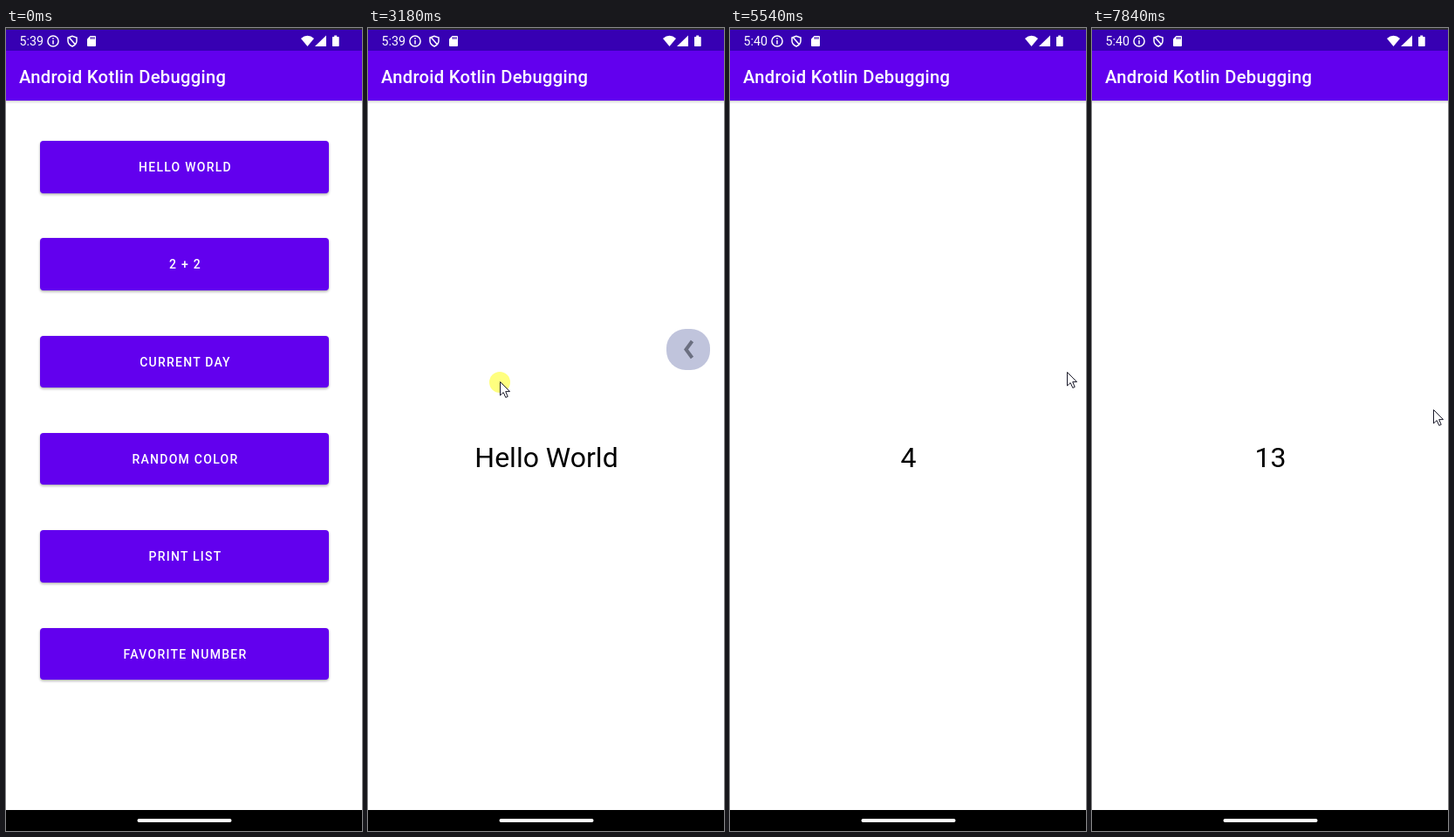
Write an HTML page that moves like this. It is 408 px wide and 918 px high and loops after 8000 ms.

```html
<!DOCTYPE html>
<html lang="en">
<head>
<meta charset="utf-8">
<title>Android Kotlin Debugging</title>
<style>
html, body { margin: 0; width: 100%; height: 100%; overflow: hidden; background: #fff; }
#stage { position: relative; width: 408px; height: 918px; overflow: hidden; font-family: Roboto, sans-serif; color: #fff; }
.page, .overlay { position: absolute; left: 0; top: 0; width: 408px; height: 918px; }
/* pages reach past the stage so a sliding page leaves no gap */
.page::before { content: ""; position: absolute; left: -100px; right: -100px; top: 0; bottom: 0; background: #fff; }
.bar { position: absolute; left: -100px; right: -100px; top: 26px; height: 56.5px; background: #6200ee; box-shadow: 0 1px 3px rgba(0,0,0,.25); }
.title { position: absolute; left: 115px; top: 0; line-height: 61px; font-size: 20.2px; font-weight: 500; letter-spacing: .3px; white-space: nowrap; }
.btn { position: absolute; left: 39px; width: 331px; height: 59.5px; border-radius: 4px; background-color: #6200ee;
  box-shadow: 0 1.5px 3px rgba(0,0,0,.32); text-align: center; line-height: 61px; font-size: 14px; font-weight: 500;
  letter-spacing: .0893em; text-indent: 2px; }
#answer { position: absolute; left: 0; width: 409px; top: 471px; line-height: 40px; text-align: center; font-size: 32px; color: #000; }
#clock { position: absolute; left: 15.5px; top: 5px; line-height: 20px; font-size: 14.2px; }
</style>
</head>
<body>
<div id="stage">
  <div class="page" id="menu"><div class="bar"><span class="title">Android Kotlin Debugging</span></div></div>
  <div class="page" id="result"><div class="bar"><span class="title">Android Kotlin Debugging</span></div><div id="answer"></div></div>
  <svg class="overlay" viewBox="0 0 408 918">
    <path fill="#3700b3" d="M0 0H408V26H0z"/>
    <path fill="#2b2a30" d="M0 0H408V2H0z"/>
    <g fill="none" stroke="#fff" stroke-width="1.5">
      <circle cx="54" cy="15" r="6.1"/>
      <path d="M54 14V18.5M54 11.2V12.7"/>
      <path d="M76 9.2L71 11V15Q71.3 19 76 21Q80.7 19 81 15V11zM72.5 11L79.5 19"/>
    </g>
    <g fill="#fff">
      <path d="M96.5 9H102Q103 9 103 10V20Q103 21 102 21H94Q93 21 93 20V12.5z"/>
      <path d="M338 12Q345.5 5.5 353 12L345.5 21z"/>
      <path d="M354 21L367 8.5V21z"/>
      <path d="M376.2 8.5H379.2V10H381Q381.7 10 381.7 10.8V20.2Q381.7 21 381 21H374.6Q374 21 374 20.2V10.8Q374 10 374.6 10H376.2z"/>
    </g>
    <path d="M97.3 10.2V12.7M99.2 10.2V12.7M101.1 10.2V12.7" stroke="#3700b3" stroke-width="1.2"/>
    <path d="M0 894H408V918H0z"/>
    <rect x="150.5" y="904" width="108" height="4" rx="2" fill="#fff"/>
    <g id="pill">
      <rect x="-25" y="-23.5" width="50" height="47" rx="22" fill="#c0c4dc"/>
      <path d="M4.5 -9.5L-2.5 0L4.5 9.5" fill="none" stroke="#6b6f80" stroke-width="4"/>
    </g>
    <circle id="press" cy="1" fill="#ff0" fill-opacity=".5"/>
    <path id="cursor" d="M.5 .5V16L4.2 12.6L6.8 18.4L9.2 17.4L6.7 11.6H11.5z" fill="#fff" stroke="#1a1a2a"/>
  </svg>
  <div id="clock"></div>
</div>
<script>
const LOOP = 8000, SHIFT = 96, SLIDE = 450;
const $ = id => document.getElementById(id);
const clamp = v => Math.min(1, Math.max(0, v));
const mix = (a, b, p) => a + (b - a) * p;
const outQuad = p => 1 - (1 - p) ** 2;
const inOut = p => p * p * (3 - 2 * p);

const buttons = ['HELLO WORLD', '2 + 2', 'CURRENT DAY', 'RANDOM COLOR', 'PRINT LIST', 'FAVORITE NUMBER'].map((label, i) => {
  const b = document.createElement('div');
  b.className = 'btn';
  b.style.top = 129 + i * 111.3 + 'px';
  b.textContent = label;
  $('menu').append(b);
  return b;
});

// cursor tip: time, x, y
const path = [
  [170, 346, 918], [1200, 111, 153], [1600, 111, 153], [2400, 387, 440], [2620, 387, 440],
  [3180, 151, 404], [3480, 150, 404], [4100, 198, 256], [4500, 198, 256], [5540, 386, 393],
  [5660, 392, 400], [5720, 392, 400], [6150, 203, 345], [6430, 204, 339], [6830, 205, 378],
  [7130, 205, 378], [7800, 391, 436], [LOOP, 391, 436]
];
// pointer held down: from, to, circle radius
const presses = [[1320, 1530, 9], [2600, 3480, 12], [4360, 4480, 9], [5680, 6260, 12], [6970, 7090, 9]];
// button ripples: start, button, x, y
const ripples = [[1560, 0, 72, 24], [4480, 1, 159, 16], [7090, 2, 166, 27]];
// back gestures: drag start, release, pill height
const swipes = [[2640, 3480, 367.5], [5740, 6260, 327.5]];
// page changes: start, opening answer or '' for closing
const changes = [[1960, 'Hello World'], [3640, ''], [4810, '4'], [6314, ''], [7400, '13']];

function bezier(x, xs, ys) {
  const at = (c, s) => c[0] * (1 - s) ** 3 + 3 * c[1] * s * (1 - s) ** 2 + 3 * c[2] * s * s * (1 - s) + c[3] * s ** 3;
  let lo = 0, hi = 1;
  for (let i = 0; i < 24; i++) {
    const mid = (lo + hi) / 2;
    if (at(xs, mid) < x) lo = mid; else hi = mid;
  }
  return at(ys, lo);
}
const emphasized = p => p >= 1 ? 1 : p < 1 / 6
  ? bezier(p, [0, .05, .13333, 1 / 6], [0, 0, .06, .4])
  : bezier(p, [1 / 6, .20833, .25, 1], [.4, .82, 1, 1]);

function place(page, x, alpha) {
  page.style.transform = x ? `translateX(${x}px)` : 'none';
  page.style.opacity = alpha;
  page.style.visibility = alpha > 0 ? 'visible' : 'hidden';
}

function drawPages(t) {
  const i = changes.filter(c => c[0] <= t).length - 1;
  if (i < 0) {
    place($('menu'), 0, 1);
    place($('result'), 0, 0);
    return;
  }
  const [start, text] = changes[i], age = t - start;
  const p = emphasized(clamp(age / SLIDE));
  $('answer').textContent = text || changes[i - 1][1];
  if (text) {
    place($('menu'), -SHIFT * p, age < SLIDE ? 1 : 0);
    place($('result'), SHIFT * (1 - p), clamp((age - 50) / 83));
  } else {
    place($('menu'), -SHIFT * (1 - p), 1);
    place($('result'), SHIFT * p, 1 - clamp((age - 35) / 83));
  }
}

function drawPointer(t) {
  const i = Math.max(1, path.findIndex(k => k[0] > t));
  const [a, b] = [path[i - 1], path[i]];
  const p = (i === 1 ? outQuad : inOut)(clamp((t - a[0]) / (b[0] - a[0])));
  const spot = `translate(${Math.round(mix(a[1], b[1], p))} ${Math.round(mix(a[2], b[2], p))})`;
  const held = presses.find(k => t >= k[0] && t < k[1]);
  $('cursor').setAttribute('transform', spot);
  $('press').setAttribute('transform', spot);
  $('press').setAttribute('r', held ? held[2] : 0);
}

function drawPill(t) {
  const s = swipes.find(k => t >= k[0] && t < k[1] + 180);
  $('pill').setAttribute('opacity', s ? 1 - clamp((t - s[1]) / 180) : 0);
  if (!s) return;
  const x = mix(435, 367, outQuad(clamp((t - s[0]) / 300))) + 5 * clamp((t - s[1]) / 180);
  $('pill').setAttribute('transform', `translate(${x} ${s[2]})`);
}

function drawRipples(t) {
  for (const [start, n, x, y] of ripples) {
    const age = t - start, r = 280 * outQuad(clamp(age / 300));
    const alpha = age < 0 ? 0 : .2 * (1 - clamp((age - 200) / 200));
    buttons[n].style.backgroundImage = alpha > 0
      ? `radial-gradient(circle at ${x}px ${y}px, rgba(255,255,255,${alpha}) ${r}px, rgba(255,255,255,0) ${r + 2}px)` : 'none';
  }
}

function draw() {
  const t = performance.now() % LOOP;
  drawPages(t);
  drawPointer(t);
  drawPill(t);
  drawRipples(t);
  $('clock').textContent = t < 5350 ? '5:39' : '5:40';
  requestAnimationFrame(draw);
}
draw();
</script>
</body>
</html>
```
